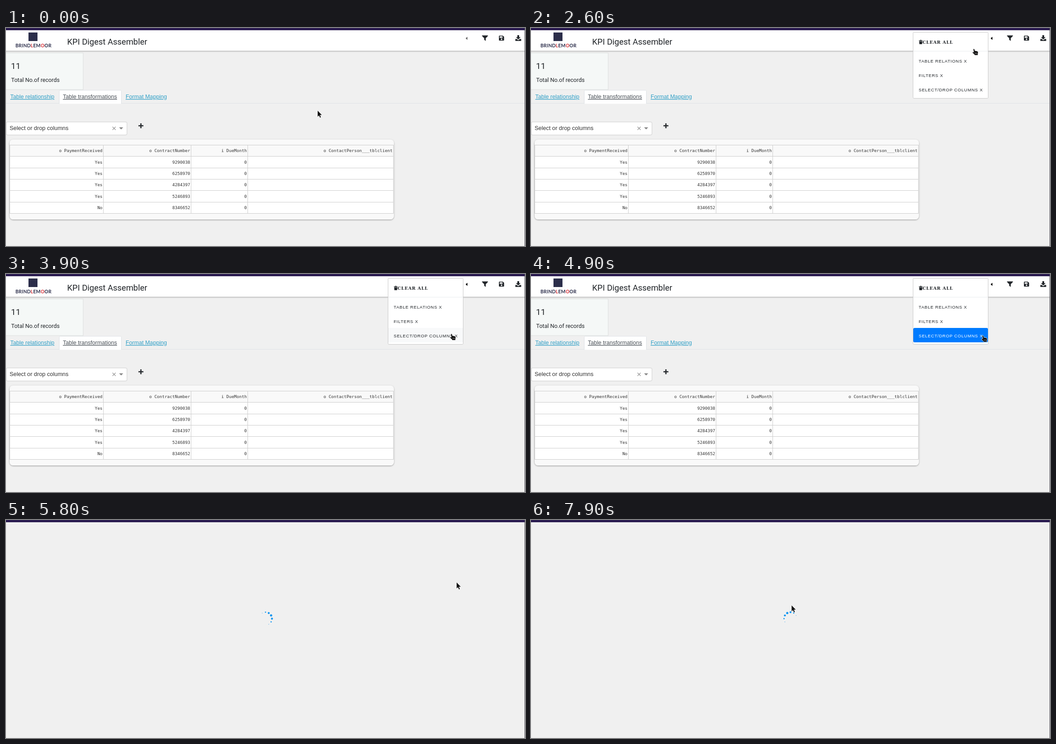
An HTML page that plays this animation: 1154 px wide and 485 px high, repeating every 8 s.

```html
<!DOCTYPE html>
<html lang="en">
<head>
<meta charset="utf-8">
<title>Report page</title>
<style>
  html, body { margin: 0; width: 100%; height: 100%; overflow: hidden; background: #f0f0f0; }
  svg { display: block; }
  text { font: 12.6px "Liberation Sans", Arial, sans-serif; fill: #333; white-space: pre; }
  .ui text, text.ui { font-family: Roboto, sans-serif; fill: #212529; }
  .link { fill: #2f9fc6; text-decoration: underline; }
  .active { fill: #495057; text-decoration: underline; }
  #table text { font: 9.45px "DejaVu Sans Mono", monospace; text-anchor: end; }
  #menu text { font-size: 9.5px; letter-spacing: .8px; fill: #212529; }
  #menu .clear { font: bold 9.5px "DejaVu Serif", serif; letter-spacing: .8px; }
  #brand { font: bold 10.5px Lato, sans-serif; letter-spacing: .2px; fill: #2b2d4a; }
</style>
</head>
<body>
<svg width="1154" height="485" viewBox="0 0 1154 485">
  <defs>
    <filter id="shadow" x="-10%" y="-30%" width="120%" height="180%">
      <feDropShadow dx="0" dy="1" stdDeviation="1.6" flood-opacity=".4"/>
    </filter>
  </defs>
  <rect width="1154" height="485" fill="#f0f0f0"/>

  <g id="page">
    <rect x="-10" y="0" width="1174" height="50.5" fill="#fff" filter="url(#shadow)"/>
    <rect x="50" y="10" width="20" height="19" fill="#2b2d4a"/>
    <text id="brand" x="21" y="43">BRIND<tspan fill="#d8393f">L</tspan>EM<tspan fill="#d8393f">O</tspan>OR</text>
    <text class="ui" x="136" y="36.5" style="font-size:18.5px">KPI Digest Assembler</text>

    <g fill="#212529">
      <path id="caret" d="M1026 19.5v7l-4-3.5z"/>
      <path d="M1058.5 16.5h13v1.2l-4.8 5v6l-3.4-2.4v-3.6l-4.8-5z"/>
      <path fill-rule="evenodd" d="M1097.2 17h7.6l2.7 2.7v7.1q0 1.2-1.2 1.2h-9.1q-1.2 0-1.2-1.2v-8.6q0-1.2 1.2-1.2zm.5 1.6v3.1h6.3v-3.1zm4.1 4.6a1.7 1.7 0 1 0 .1 0z"/>
      <path d="M1137 16h4v4.5h3.2l-5.2 5-5.2-5h3.2zM1132.5 24.5h3.2l3.3 2.7 3.3-2.7h3.2v4.3h-13z"/>
    </g>

    <g class="ui">
      <rect x="-.5" y="55.5" width="172" height="81.5" fill="#f5f8f7" stroke="#dcdfde"/>
      <text x="11" y="91" style="font-size:19px">11</text>
      <text x="11.5" y="119.5">Total No.of records</text>
    </g>

    <path d="M0 167.5H1153" stroke="#dee2e6"/>
    <path d="M118.5 168.5v-28q0-2 2-2h134q2 0 2 2v28" fill="#fff" stroke="#dee2e6"/>
    <text class="link" x="9.5" y="157">Table relationship</text>
    <text class="active" x="126.5" y="157">Table transformations</text>
    <text class="link" x="266" y="157">Format Mapping</text>

    <rect x=".5" y="209" width="268.5" height="29" rx="3" fill="#fff" stroke="#ccc"/>
    <text x="8" y="227" style="font-size:12.8px">Select or drop columns</text>
    <path d="M236.8 219.8l7 7m0-7l-7 7" stroke="#999" stroke-width="1.3"/>
    <path d="M251.5 221h9l-4.5 4.8z" fill="#888"/>
    <path d="M300 212v11m-5.5-5.5h11" stroke="#212529" stroke-width="2.6"/>

    <rect x="8" y="248" width="854.5" height="178" rx="8" fill="#f9f9f9" filter="url(#shadow)"/>
    <g id="table"></g>
  </g>

  <g id="menu">
    <rect x="849.5" y="9.5" width="167" height="147" rx="2" fill="#fff" stroke="#c8c8c8"/>
    <path d="M850 51.5h166" stroke="#e9ecef"/>
    <path d="M862.5 27.5h2.2l.6-1h2.6l.6 1h2.2v1.3h-8.2zm.6 2h7l-.5 6.5h-6z" fill="#212529"/>
    <text class="clear" x="870.5" y="34.5">CLEAR ALL</text>
    <rect id="option" x="850" y="120" width="166" height="32"/>
    <text x="862" y="77">TABLE RELATIONS X</text>
    <text x="862" y="109">FILTERS X</text>
    <text id="optionText" x="862" y="141">SELECT/DROP COLUMNS X</text>
  </g>

  <g id="spinner" fill="#1296f0"></g>
  <rect width="1154" height="5" fill="#2a1b50"/>
  <path d="M1153.5 0V485" stroke="#55535c"/>

  <path id="arrow" d="M0 0v13.2l3-2.8 2.2 5 2-.9-2.2-4.9h4.2z" fill="#111" stroke="#fff" stroke-width=".8" paint-order="stroke"/>
  <g id="hand">
    <path d="M2.6 1.5q1.2-1.2 2.2.3l1.1 4 1.6-.6 1.3.8 1.3-.3 1.1 1 1.2.4.6 2.2-.6 3v2.4H5.6l-.8-1.8-3.9-3.3q-.4-1.5 1.2-1.5l1.8.9z" fill="#111" stroke="#fff" stroke-width="1.2" paint-order="stroke"/>
    <path d="M6.7 9.5v3m2-3v3m2-3v3" stroke="#ccc" stroke-width=".6"/>
  </g>
</svg>
<script>
const $ = id => document.getElementById(id);
const show = (id, on) => $(id).style.display = on ? '' : 'none';

// Data grid
const edges = [8.5, 216.5, 411.5, 537.5, 861.5];
const rows = [
  ['o PaymentReceived', 'o ContractNumber', 'i DueMonth', 'o ContactPerson___tblclient'],
  ['Yes', '9290038', '0', ''],
  ['Yes', '6258970', '0', ''],
  ['Yes', '4284397', '0', ''],
  ['Yes', '5246893', '0', ''],
  ['No', '8346652', '0', '']
];
const rowTop = r => Math.round(261 + r * 25.35) - .5;
$('table').innerHTML = rows.map((cells, r) => cells.map((label, c) => {
  const x = edges[c], right = edges[c + 1], y = rowTop(r), h = rowTop(r + 1) - y;
  return `<rect x="${x}" y="${y}" width="${right - x}" height="${h}" fill="${r ? '#fff' : '#f9f9f9'}" stroke="#ccc"/>
    <text x="${right - 2}" y="${y + h / 2 + 3.4}">${label}</text>`;
}).join('')).join('');

// Loading ring
const dots = Array.from({ length: 12 }, (_, i) => {
  const dot = document.createElementNS('http://www.w3.org/2000/svg', 'circle');
  const angle = i * Math.PI / 6;
  dot.setAttribute('cx', 577 + 14.4 * Math.sin(angle));
  dot.setAttribute('cy', 219.5 - 14.4 * Math.cos(angle));
  return $('spinner').appendChild(dot);
});

// Pointer keys: time, x, y
const arrowPath = [
  [500, 693, 184], [700, 950, 95], [800, 1070, 45], [900, 1018, 40],
  [1000, 1018, 40], [1300, 1018, 22], [1500, 1018, 22],
  [5100, 1002, 139], [7000, 1002, 139], [7300, 790, 166], [7600, 590, 188], [7700, 579.5, 190]
];
const handPath = [
  [2500, 1017, 21], [2700, 945, 70], [2900, 873, 125], [3000, 883, 125], [3100, 892, 119],
  [3200, 892, 119], [3600, 950, 130], [4000, 999, 133], [4200, 999, 133], [4400, 1001, 136]
];

function along(path, t) {
  const next = path.findIndex(key => key[0] > t);
  if (next < 1) return (next ? path[path.length - 1] : path[0]).slice(1);
  const a = path[next - 1], b = path[next], k = (t - a[0]) / (b[0] - a[0]);
  return [a[1] + (b[1] - a[1]) * k, a[2] + (b[2] - a[2]) * k];
}

function place(id, path, t) {
  $(id).setAttribute('transform', `translate(${along(path, t)})`);
}

function draw(t) {
  const loading = t >= 5100, hand = t >= 1500 && !loading;
  const open = t >= 2000 && !loading, chosen = t >= 4900;
  show('page', !loading);
  show('menu', open);
  show('spinner', loading);
  show('arrow', !hand);
  show('hand', hand);
  $('caret').setAttribute('fill', open ? '#000' : '#666');
  $('option').setAttribute('fill', chosen ? '#007bff' : t >= 2800 ? '#f8f9fa' : '#fff');
  $('option').setAttribute('rx', chosen ? 3 : 0);
  $('optionText').style.fill = chosen ? '#fff' : '';
  place('arrow', arrowPath, t);
  place('hand', handPath, t);

  const head = (t - 5600) / 100;
  dots.forEach((dot, i) => {
    const offset = ((i - head + 6) % 12 + 12) % 12 - 6;
    const k = Math.max(0, 1 - Math.abs(offset) / 4.4);
    dot.setAttribute('r', 2.5 * k * k * (3 - 2 * k));
  });
}

const start = performance.now();
(function tick() {
  const t = (performance.now() - start) % 8000;
  draw(Math.floor(t / 100) * 100);
  requestAnimationFrame(tick);
})();
</script>
</body>
</html>
```
